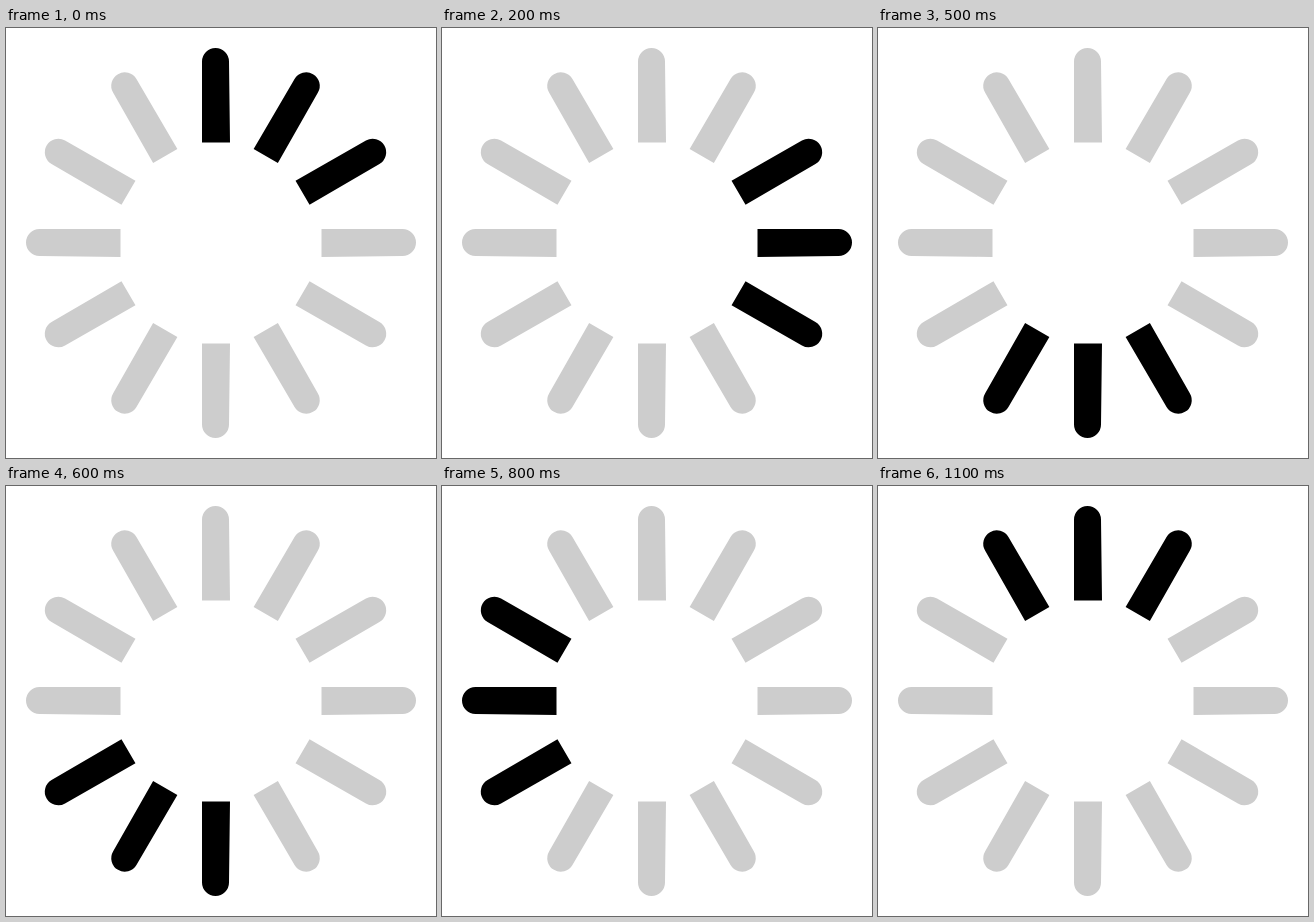
These frames come from a looping animation (430x430 px, 1.2 s). An HTML page:

```html
<!DOCTYPE html>
<html lang="en">
<head>
<meta charset="utf-8">
<title>Spinner</title>
<style>
  html, body { margin: 0; width: 100%; height: 100%; overflow: hidden; background: #fff; }
  svg { display: block; width: 100vw; height: 100vh; }
  path { fill: #cdcdcd; animation: lit 1200ms step-end infinite; }
  @keyframes lit {
    0% { fill: #000; }
    25%, 100% { fill: #cdcdcd; }
  }
</style>
</head>
<body>
<svg id="spinner" viewBox="0 0 430 430"></svg>
<script>
  const COUNT = 12, STEP = 100, LIT = 3;
  const INNER = 100.5, TIP = 181.5, CAP = 13.5;
  const spinner = document.getElementById('spinner');

  for (let i = 0; i < COUNT; i++) {
    const level = i % 6 === 3;
    // Upright and level bars widen on one side only.
    const lean = i % 3 ? 0 : i < 6 ? 0.5 : -0.5;
    const bar = document.createElementNS('http://www.w3.org/2000/svg', 'path');
    bar.setAttribute('d',
      `M${lean - 14} ${-INNER}L${-CAP} ${-TIP}` +
      `A${CAP} ${CAP} 0 0 1 ${CAP} ${-TIP}L${lean + 14} ${-INNER}Z`);
    bar.setAttribute('transform',
      `translate(${level ? '215 214.5' : '209.5 215'}) rotate(${i * 360 / COUNT})`);
    bar.style.animationDelay = `${(i + 1 - LIT - COUNT) * STEP}ms`;
    spinner.append(bar);
  }
</script>
</body>
</html>
```
